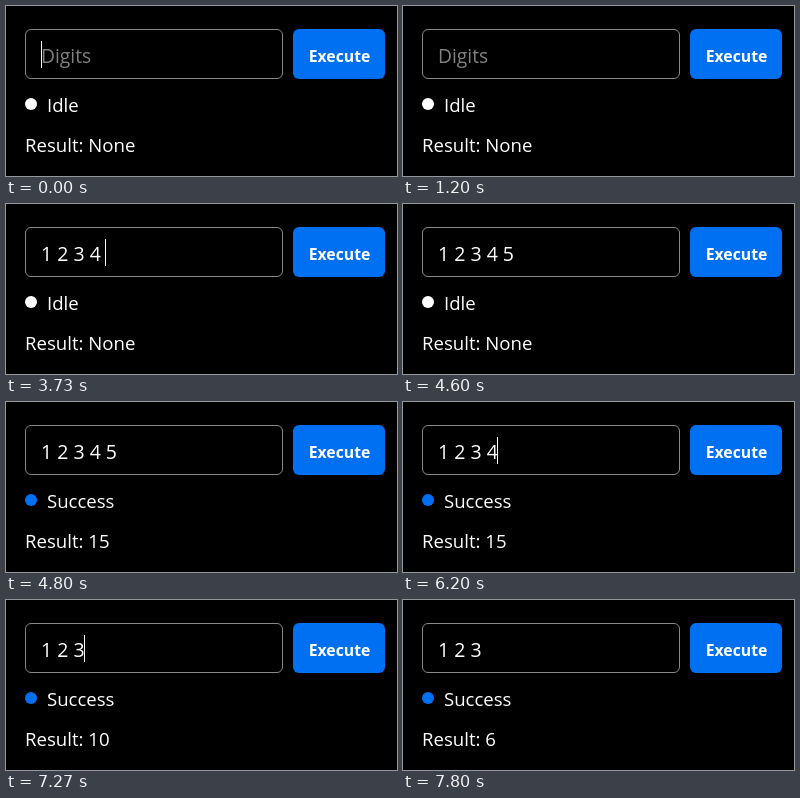
These frames come from a looping animation (391x170 px, 8000 ms). An HTML page:

```html
<!DOCTYPE html>
<html lang="en">
<head>
<meta charset="utf-8">
<title>Digit sum</title>
<style>
  html, body { margin: 0; width: 100%; height: 100%; overflow: hidden; background: #000; }
  svg { display: block; }
  text { font: 500 18.6px "Open Sans", "Noto Sans", sans-serif; fill: #fff; white-space: pre; }
  #value { font-size: 19.5px; }
  #placeholder { font-size: 19.2px; fill: #808080; }
  #button { font-size: 15.8px; font-weight: 700; text-anchor: middle; }
</style>
</head>
<body>
<svg width="391" height="170" viewBox="0 0 391 170">
  <rect x="19.5" y="23.5" width="257" height="49" rx="5.5" fill="#000" stroke="#888"/>
  <text id="placeholder" x="35" y="57">Digits</text>
  <text id="value" x="35" y="57"></text>
  <rect id="caret" y="35" width="1" height="27" fill="#fff"/>
  <rect x="287" y="23" width="92" height="50" rx="6" fill="#0070f3"/>
  <text id="button" x="333.5" y="56">Execute</text>
  <circle id="dot" cx="25" cy="98" r="6"/>
  <text id="status" x="41" y="106"></text>
  <text id="result" x="19" y="146"></text>
</svg>
<script>
const LOOP = 8000;
const BLINK = 530;
const RUN_TIME = 130;
const FULL_TEXT = "1 2 3 4 5";

// When the user types a character, erases the last digit with its space, and runs the sum.
const keys = [1670, 2270, 2530, 2800, 3000, 3330, 3530, 3730, 4070];
const erasures = [5800, 7070];
const runs = [4670, 6530, 7600];

const byId = id => document.getElementById(id);
const [placeholder, value, caret, dot, status, result] =
  ["placeholder", "value", "caret", "dot", "status", "result"].map(byId);

const past = (times, now) => times.filter(time => time <= now);

function textAt(now) {
  const length = past(keys, now).length - 2 * past(erasures, now).length;
  return FULL_TEXT.slice(0, length);
}

function resultAt(now) {
  const run = past(runs, now).at(-1);
  if (run === undefined || now < run + RUN_TIME) return null;
  return textAt(run).split(" ").reduce((sum, digit) => sum + Number(digit), 0);
}

function draw(now) {
  const text = textAt(now);
  value.textContent = text;
  placeholder.style.display = text ? "none" : "";

  const digits = Math.ceil(text.length / 2);
  const spaces = text.length - digits;
  caret.setAttribute("x", Math.floor(35 + digits * 10.72 + spaces * 5.45));

  // Each typed key restarts the blinking; the field was focused before the loop begins.
  const blinkStart = past(keys, now).at(-1) ?? -400;
  const hidden = Math.floor((now - blinkStart) / BLINK) % 2;
  caret.style.display = hidden ? "none" : "";

  const sum = resultAt(now);
  const idle = sum === null;
  dot.setAttribute("fill", idle ? "#fff" : "#0070f3");
  status.textContent = idle ? "Idle" : "Success";
  result.textContent = "Result: " + (idle ? "None" : sum);
}

function tick(now) {
  draw(now % LOOP);
  requestAnimationFrame(tick);
}
draw(0);
requestAnimationFrame(tick);
</script>
</body>
</html>
```
